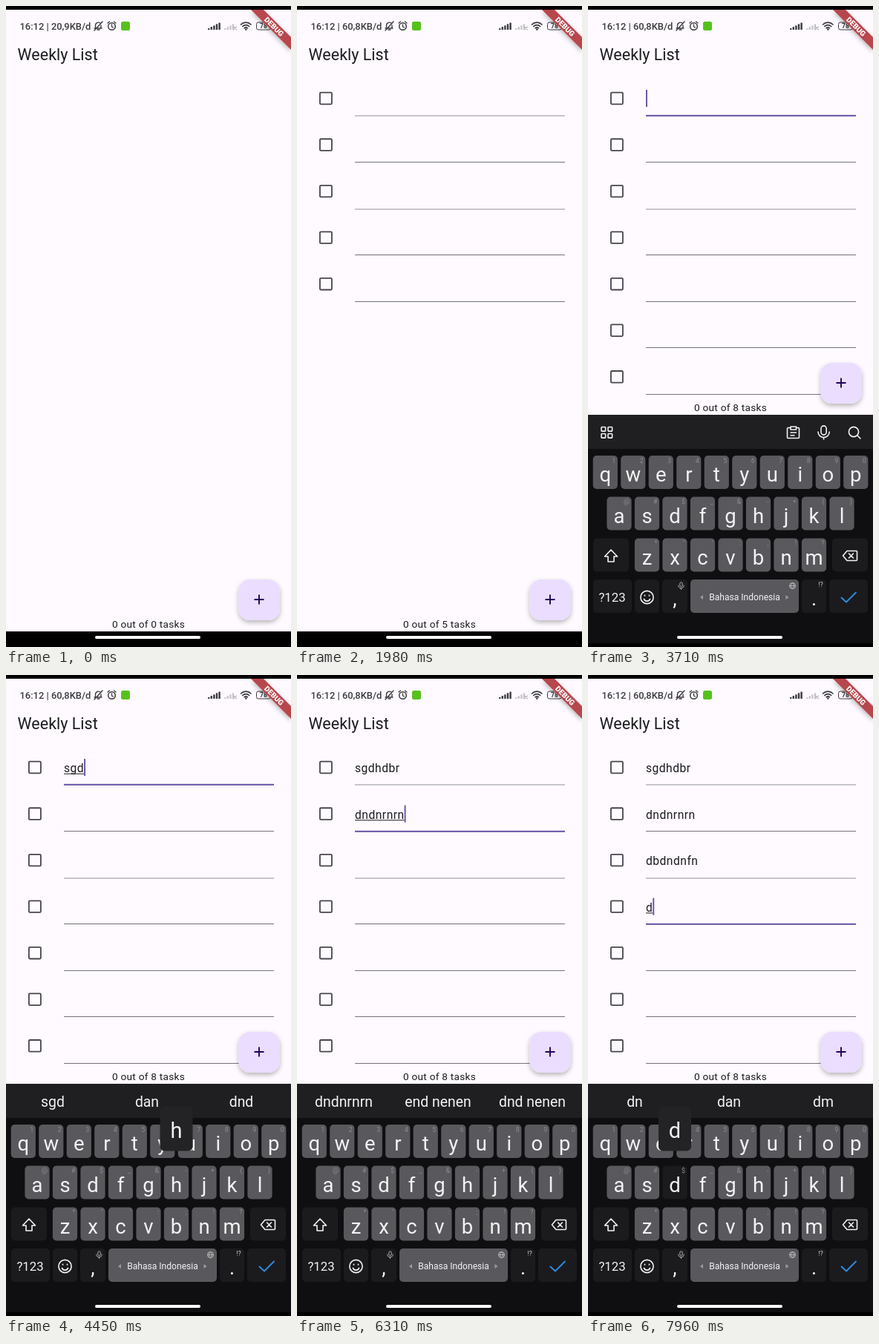
These frames come from a looping animation (384x864 px, 8000 ms). An HTML page:

```html
<!DOCTYPE html>
<html lang="en">
<head>
<meta charset="utf-8">
<title>Task list</title>
<style>
  html, body { margin: 0; width: 100%; height: 100%; overflow: hidden; background: #000; }
  svg { display: block; width: 384px; height: 864px; font-family: Roboto, sans-serif; }
  text { white-space: pre; }
  .line { fill: none; stroke-linecap: round; stroke-linejoin: round; }
</style>
</head>
<body>
<svg id="stage" viewBox="0 0 384 864">
  <defs>
    <filter id="shadow" x="-40%" y="-40%" width="180%" height="190%">
      <feDropShadow dx="0" dy="3" stdDeviation="3" flood-color="#000" flood-opacity=".28"/>
    </filter>
    <clipPath id="screen"><rect y="5" width="384" height="859"/></clipPath>
  </defs>
</svg>
<script>
const LOOP = 8000, PITCH = 62.55, RISE = 292;
const INK = '#1c1b1f', PAPER = '#fefaff', PURPLE = '#6750a4', STATUS = '#3b3a3f';
const GLOW = '#f3f3f5', FAINT = '#c4c4c8', MARK = '#8c8c91';
const BOARD = '#0f0f11', STRIP = '#1f1f22', KEY = '#59595d', DARK = '#1b1b1e', POPUP_FILL = '#232326';
const ADDED = [700, 1010, 1320, 1630, 1940, 2250, 2560, 2870];
const FIELDS = [
  { focus: 3350, start: 3900, step: 150, word: 'sgdhdbr' },
  { focus: 5140, start: 5250, step: 110, word: 'dndnrnrn' },
  { focus: 6560, start: 6660, step: 115, word: 'dbdndnfn' },
  { focus: 7740, start: 7830, step: 100, word: 'dd' }
];
const PRESS = 70, POPUP = 150, LAG = 115;

const stage = document.getElementById('stage');

function add(parent, tag, attrs = {}, content) {
  const node = document.createElementNS('http://www.w3.org/2000/svg', tag);
  for (const name in attrs) node.setAttribute(name, attrs[name]);
  if (content !== undefined) node.textContent = content;
  return parent.appendChild(node);
}
const group = (parent, attrs) => add(parent, 'g', attrs);
const rect = (parent, x, y, width, height, fill, rx = 0) =>
  add(parent, 'rect', { x, y, width, height, fill, rx });
const label = (parent, x, y, size, fill, content, extra = {}) =>
  add(parent, 'text', { x, y, 'font-size': size, fill, ...extra }, content);
const centred = (parent, x, y, size, fill, content, extra = {}) =>
  label(parent, x, y, size, fill, content, { 'text-anchor': 'middle', ...extra });
const line = (parent, d, stroke, width = 1.6) =>
  add(parent, 'path', { d, stroke, 'stroke-width': width, class: 'line' });
const circle = (parent, cx, cy, r, stroke, width = 1.6) =>
  add(parent, 'circle', { cx, cy, r, stroke, 'stroke-width': width, fill: 'none' });
const show = (node, on) => { node.style.display = on ? '' : 'none'; };
const put = (node, content) => { if (node.textContent !== content) node.textContent = content; };

// Page, status bar and title
rect(stage, 0, 0, 384, 864, '#000');
rect(stage, 0, 5, 384, 838, PAPER);

const status = group(stage);
const speed = label(status, 18.5, 32, 12.9, STATUS, '', { 'font-weight': 500 });
line(status, 'M119 30h10M120.5 29v-3a4 4 0 0 1 7-2.5M128 26v4M123 32h3M119 33L130 21', STATUS, 1.4);
circle(status, 142.5, 27.5, 4.8, STATUS, 1.5);
line(status, 'M142.5 25v3l2 1M137 23l2.5-2M148 23l-2.5-2', STATUS, 1.3);
rect(status, 155, 21, 12, 12, '#55c21b', 2.5);
for (let i = 0; i < 5; i++) {
  rect(status, 272 + i * 3.6, 30 - i * 1.9, 2.4, 2 + i * 1.9, STATUS, 0.6);
  if (i < 4) rect(status, 294 + i * 3.6, 30 - i * 1.9, 2.4, 2 + i * 1.9, '#c9c6cc', 0.6);
}
line(status, 'M306.5 28l4 4m0-4l-4 4', '#b3b0b6', 1.1);
line(status, 'M316.5 25a9.5 9.5 0 0 1 13.5 0M318.7 27.5a6.5 6.5 0 0 1 9 0M321 29.8a3.5 3.5 0 0 1 4.5 0', STATUS, 1.7);
add(status, 'circle', { cx: 323.3, cy: 31.6, r: 1.3, fill: STATUS });
add(status, 'rect', { x: 337.5, y: 22, width: 19, height: 10, rx: 2.5, fill: 'none', stroke: STATUS });
rect(status, 357.5, 25, 1.5, 4, STATUS);
centred(status, 347, 30.3, 8.5, STATUS, '78', { 'font-weight': 700 });
label(stage, 15.6, 73, 21.5, INK, 'Weekly List');

// Task rows
const rows = ADDED.map((time, i) => {
  const g = group(stage), y = 124.5 + PITCH * i, base = Math.floor(147.9 + PITCH * i);
  add(g, 'rect', { x: 30.9, y: y - 7.8, width: 16, height: 15.6, rx: 1.2, fill: 'none', stroke: '#49454f', 'stroke-width': 1.8 });
  const soft = [0, 2, 7].includes(i);
  const rule = rect(g, 78, base, 283, soft ? 1.8 : 1, soft ? '#c3bfc8' : '#77727c');
  const active = rect(g, 78, base - 0.2, 283, 2, PURPLE);
  const text = label(g, 78, 131 + PITCH * i, 15.63, INK, '', { 'letter-spacing': 0.49 });
  const underline = rect(g, 78, 132.7 + PITCH * i, 0, 1, INK);
  const caret = rect(g, 78, 113 + PITCH * i, 1.9, 23, PURPLE);
  return { g, rule, active, text, underline, caret };
});

// Footer and add button
const footer = group(stage);
rect(footer, 0, 825, 384, 18, PAPER);
const count = centred(footer, 192, 838, 13.67, INK, '', { 'letter-spacing': 0.24 });
const button = rect(footer, 313.4, 773, 55.5, 55, '#eaddff', 15.6);
button.setAttribute('filter', 'url(#shadow)');
line(footer, 'M341 793.5v13M334.5 800h13', '#21005d', 1.9).style.strokeLinecap = 'butt';

// Debug ribbon
const ribbon = group(stage, { 'clip-path': 'url(#screen)' });
add(ribbon, 'path', { d: 'M330 5h17L384 42v17z', fill: '#b8474d', filter: 'url(#shadow)' });
centred(ribbon, 0, 3.6, 10, '#fff', 'DEBUG', { 'font-weight': 900, transform: 'translate(361.2 27.8) rotate(45)' });

// Keyboard
const board = group(stage);
rect(board, 0, 551, 384, 308, BOARD);
rect(board, 0, 859, 384, 300, '#000');
rect(board, 0, 551, 384, 46, STRIP);

const tools = group(board);
for (const [x, y] of [[18, 567.5], [27, 567.5], [18, 576.5], [27, 576.5]])
  add(tools, 'rect', { x, y, width: 5.6, height: 5.6, rx: 0.8, fill: 'none', stroke: GLOW, 'stroke-width': 1.6 });
line(tools, 'M272 568.5h-2.5q-1 0-1 1v12q0 1 1 1h14q1 0 1-1v-12q0-1-1-1h-2.5M273 567h7.5v4h-7.5zM273 575h7.5M273 578.7h5', GLOW);
line(tools, 'M314 569.5a3.6 3.6 0 0 1 7.2 0v5a3.6 3.6 0 0 1-7.2 0zM310 574a7.6 7.6 0 0 0 15.2 0M317.6 581.6v2.4', GLOW);
circle(tools, 358, 574, 6.6, GLOW);
line(tools, 'M363 579l4 4', GLOW);

const hints = group(board);
const suggestions = [63, 190, 317].map(x => centred(hints, x, 582, 19.4, GLOW, ''));

const keys = {};
function keyRow(letters, marks, x0, top) {
  [...letters].forEach((letter, i) => {
    const x = x0 + 37.5 * i;
    const back = rect(board, x - 16.6, top, 33.2, 45, KEY, 5);
    label(board, x + 14, top + 9.5, 9, MARK, marks[i], { 'text-anchor': 'end' });
    centred(board, x, top + 35, 27.5, GLOW, letter);
    keys[letter] = { x, top, back };
  });
}
keyRow('qwertyuiop', '1234567890', 23.3, 606);
keyRow('asdfghjkl', '@#$_&-+()', 42, 661.5);
keyRow('zxcvbnm', '*"\':;!?', 79.5, 717.5);

for (const [x, y, w] of [[7, 717.5, 48], [329, 717.5, 48], [7, 773, 52], [63, 773, 33], [100, 773, 34], [288, 773, 33], [325, 773, 52]])
  rect(board, x, y, w, 45, DARK, 5);
rect(board, 138, 773, 146, 45, KEY, 5);
line(board, 'M31 733l8.5 9h-4.5v7h-8v-7h-4.5z', GLOW);
line(board, 'M349 734.5h12.5q1 0 1 1v11q0 1-1 1h-12.5l-5.5-6.5zM351.5 738l6 6m0-6l-6 6', GLOW);
centred(board, 32.5, 803, 16.8, GLOW, '?123');
circle(board, 79.5, 797, 8.6, GLOW);
line(board, 'M75.5 799.5a4.3 4.3 0 0 0 8 0M76.5 794.5v.3M82.5 794.5v.3', GLOW, 1.8);
centred(board, 117, 808, 27, GLOW, ',');
line(board, 'M123.8 778.5a1.7 1.7 0 0 1 3.4 0v2.5a1.7 1.7 0 0 1-3.4 0zM121.8 781a3.7 3.7 0 0 0 7.4 0M125.5 785v1.5', FAINT, 0.9);
centred(board, 211, 801, 12.1, GLOW, 'Bahasa Indonesia');
add(board, 'path', { d: 'M155 794v6l-4-3zM266.5 794v6l4-3z', fill: '#9c9ca0' });
circle(board, 275.5, 781.5, 4, FAINT, 0.9);
line(board, 'M271.5 781.5h8M275.5 777.5q-4 4 0 8q4-4 0-8', FAINT, 0.8);
centred(board, 304.5, 808, 27, GLOW, '.');
centred(board, 313.5, 783, 9, FAINT, '!?');
line(board, 'M341.5 797.5l6.5 6l13-13', '#2d8de0', 1.9);

const popups = {};
for (const letter of new Set(FIELDS.map(f => f.word).join(''))) {
  const { x, top } = keys[letter];
  const g = popups[letter] = group(board);
  rect(g, x - 22, top - 79.5, 44, 59.5, POPUP_FILL, 6);
  centred(g, x, top - 37.5, 29, GLOW, letter);
}

rect(stage, 120, 849, 142, 4, '#fff', 2);

function suggest(typed) {
  if (typed.length === 1) return ['n', 'an', 'm'].map(end => typed + end);
  return typed.length > 4 ? [typed, 'end nenen', 'dnd nenen'] : [typed, 'dan', 'dnd'];
}

function render(t) {
  const total = ADDED.filter(time => t >= time).length;
  const current = FIELDS.filter(f => t >= f.focus).length - 1;
  const slide = Math.min(1, Math.max(0, (t - 3400) / 270));
  const raised = 1 - (1 - slide) ** 3;

  put(speed, `16:12 | ${t < 1900 ? '20,9' : '60,8'}KB/d`);
  put(count, `0 out of ${total} tasks`);
  footer.setAttribute('transform', `translate(0 ${-RISE * raised})`);
  board.setAttribute('transform', `translate(0 ${RISE * (1 - raised)})`);
  show(board, slide > 0);

  const pressed = new Set(), popped = new Set();
  let typed = '';
  rows.forEach((row, i) => {
    const field = FIELDS[i], focused = i === current;
    let text = '', lastChange = field ? field.focus : 0;
    if (field) [...field.word].forEach((letter, n) => {
      const age = t - field.start - n * field.step;
      if (age >= 0 && age < PRESS) pressed.add(letter);
      if (age >= 0 && age < POPUP) popped.add(letter);
      if (age >= LAG) { text += letter; lastChange = t - age + LAG; }
    });
    if (focused) typed = text;
    show(row.g, i < total);
    put(row.text, text);
    const lit = focused && t - field.focus > 50;
    show(row.active, lit);
    show(row.rule, !lit);
    const width = text ? row.text.getComputedTextLength() : 0;
    row.underline.setAttribute('width', focused ? width : 0);
    row.caret.setAttribute('x', 78 + width);
    show(row.caret, focused && (t - lastChange) % 1000 < 500);
  });

  show(tools, !typed);
  show(hints, typed);
  if (typed) suggest(typed).forEach((word, i) => put(suggestions[i], word));
  for (const letter in popups) {
    show(popups[letter], popped.has(letter));
    keys[letter].back.setAttribute('fill', pressed.has(letter) ? DARK : KEY);
  }
}

const begun = performance.now();
function tick() {
  render((performance.now() - begun) % LOOP);
  requestAnimationFrame(tick);
}
tick();
</script>
</body>
</html>
```
